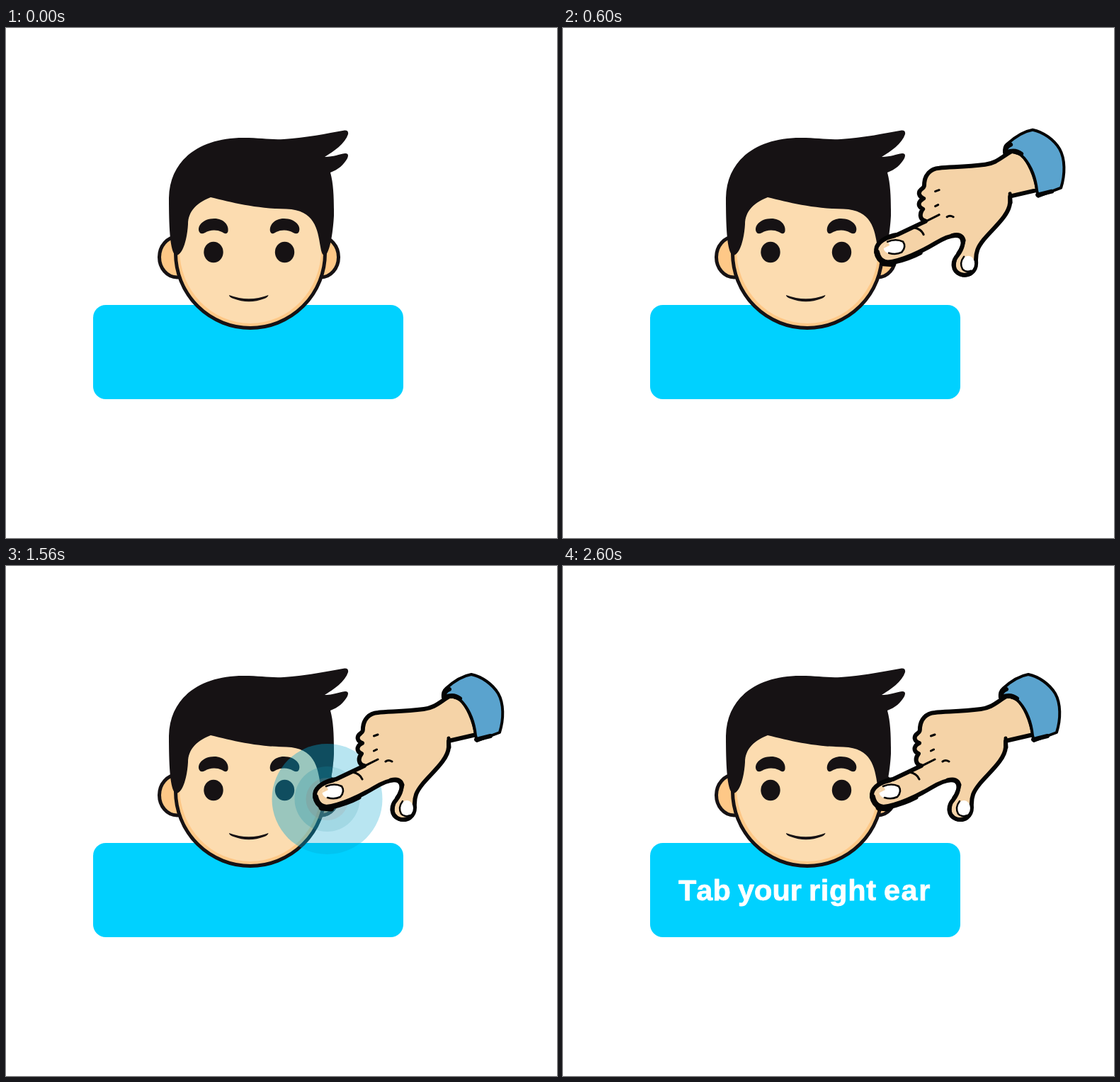
Write an HTML page that moves like this. It is 778 px wide and 720 px high and loops after 4800 ms.

```html
<!DOCTYPE html>
<html lang="en">
<head>
<meta charset="utf-8">
<title>Tab your right ear</title>
<style>
  html, body { margin: 0; width: 100%; height: 100%; overflow: hidden; background: #fff; }
  svg { display: block; width: 100%; height: 100%; }
  .ink { fill: #161214; }
  .line { fill: none; stroke: #050505; stroke-linecap: round; stroke-linejoin: round; }
  .ear { fill: #fec887; stroke: #161214; stroke-width: 5; }
  text {
    font: bold 41.5px "Liberation Sans", Arial, sans-serif;
    font-kerning: none;
    fill: #fff; stroke: #fff; stroke-width: .8; stroke-linejoin: round;
  }
</style>
</head>
<body>
<svg viewBox="0 0 778 720">
  <defs>
    <linearGradient id="edge" gradientUnits="userSpaceOnUse" y1="0" y2="0">
      <stop offset="0" stop-color="#fff"/>
      <stop offset="1" stop-color="#000"/>
    </linearGradient>
    <mask id="wipe" maskUnits="userSpaceOnUse" x="123" y="391" width="438" height="133">
      <rect x="123" y="391" width="438" height="133" fill="url(#edge)"/>
    </mask>
    <clipPath id="onHead">
      <circle cx="345" cy="318" r="108"/>
      <ellipse cx="444.5" cy="323.5" rx="27.5" ry="31"/>
      <use href="#hair"/>
    </clipPath>
    <g id="pulse">
      <circle cx="453.5" cy="329" fill="#06a5d0"/>
      <circle cx="453.5" cy="329" fill="#1b8ca3"/>
      <circle cx="453.5" cy="329" fill="#8a8580"/>
    </g>
  </defs>

  <rect x="123" y="391" width="438" height="133" rx="18" fill="#00d1ff"/>
  <g mask="url(#wipe)">
    <text y="472"><tspan x="163">Tab</tspan> <tspan x="247">your</tspan> <tspan x="347" letter-spacing=".7">right</tspan> <tspan x="453" letter-spacing="1.5">ear</tspan></text>
  </g>

  <use id="glow" href="#pulse"/>

  <g id="head">
    <ellipse class="ear" cx="241.5" cy="323.5" rx="25" ry="28.5"/>
    <ellipse class="ear" cx="444.5" cy="323.5" rx="25" ry="28.5"/>
    <circle cx="345" cy="318" r="105.5" fill="#fec887" stroke="#161214" stroke-width="5"/>
    <ellipse cx="345" cy="313" rx="100" ry="104" fill="#fcdcb0"/>
    <path id="hair" class="ink" d="M240 321C232 318 230 285 230 240C231 185 275 155 335 155C360 155 372 158 392 157
      C425 155 452 149 478 144.500Q484 144 483 150C479 163 463 174 450 182C463 182 470 178 479 177
      Q485 177 482 184C477 193 469 200 458 204C463 222 463 245 463 265C462 285 458 315 451 321
      Q446 323 444 309C440 284 436 257 396 255.500C352 255 318 246 289 239C268 247 257 260 257 277C256 296 250 321 240 321Z"/>
    <g id="brow">
      <path class="ink" d="M273 288C269 280 278 269 294 269C308 269 315 279 313.500 287C312 292 308 290 305 288C297 284 287 285 281 289Q275 292 273 288Z"/>
      <ellipse class="ink" cx="293" cy="316.500" rx="13.700" ry="14.700"/>
    </g>
    <use href="#brow" transform="translate(686.500 0) scale(-1 1)"/>
    <path class="ink" d="M315 377Q343 387.500 370.500 377Q370 380 365 382Q343 390.500 321 382Q315 380 315 377Z"/>
  </g>

  <g clip-path="url(#onHead)"><use href="#pulse"/></g>

  <g id="hand">
    <path class="line" stroke-width="6" style="fill:#f5d3a7" d="M628 183C612 192 606 200 590 202C560 206 540 205 525 207
      C512 208 505 217 504 228C504 232 504 234 501 236C494 241 496 247 503 250C495 254 494 261 502 265
      C497 271 497 280 506 282L466 301C452 303 437 311 436 322C436 332 442 338 452 340
      C472 338 500 325 520 313C535 304 548 300 555 304C562 310 557 322 551 330C543 339 543 352 555 357
      C567 361 577 353 577 341C576 325 580 318 588 308C600 293 624 274 625 256L625 247L664 238
      C661 218 652 197 641 187Z"/>
    <path class="line" stroke-width="8" d="M437 326Q439 336 447 340"/>
    <path class="line" stroke-width="9" d="M446 341L459 342"/>
    <path class="line" stroke-width="5" d="M460 341Q482 336 499 327M437 318Q443 307 462 303M547 338Q543 354 557 358Q570 360 575 350"/>
    <path class="line" stroke-width="5" d="M543 302Q557 298 560 309Q558 319 552 327M625 243L626 256"/>
    <path class="line" stroke-width="3" d="M503 284L525 273M489 291Q500 293 503 301M519.500 240L525 238M519.500 261L523.500 259M536 276Q540 273 545 276"/>
    <ellipse cx="461.500" cy="319" rx="15" ry="9.500" fill="#fff" transform="rotate(-6 461.500 319)"/>
    <path d="M445 321L452 310L455 316Z" fill="#f5d3a7"/>
    <path class="line" stroke-width="2.600" d="M452 311Q464 306 474 311Q479 318 472 326Q464 330 454 327"/>
    <ellipse cx="566" cy="342" rx="9" ry="11" fill="#fff"/>
    <path class="line" stroke-width="2.400" d="M560 332Q553 341 558 350Q563 355 570 352"/>
    <path class="line" stroke-width="4" style="fill:#5aa3ce" d="M617 186Q616 177 621 173C632 163 645 155 657 153
      C672 156 687 167 695 180C703 194 703 216 697 235L665 247L663 239C661 220 655 205 645 193C639 186 630 182 617 186Z"/>
    <path class="line" stroke-width="6" d="M618 184Q619 177 626 174M620 185Q632 180 641 187M664 245L684 240"/>
  </g>
</svg>
<script>
const LOOP = 4800, STEP = 40;
const $ = q => document.querySelector(q);
const hand = $('#hand'), edge = $('#edge'), glow = $('#glow');
const discs = [...document.querySelectorAll('#pulse circle')];

const clamp = x => Math.min(1, Math.max(0, x));
const span = (t, a, b) => clamp((t - a) / (b - a));
const smooth = x => x * x * (3 - 2 * x);

// Each row: time, then radius and opacity of one disc
const pulse = [
  [[940, 0, .88], [1120, 18, .88], [1360, 47.5, .88], [1440, 60, .75], [1560, 78, .4], [1680, 75, .24], [1760, 72, .2], [1960, 62, 0]],
  [[1400, 30, 0], [1560, 46, .25], [1760, 41, .34], [1960, 34, 0]],
  [[1400, 15, 0], [1560, 30, .25], [1760, 26, .3], [1960, 20, 0]]
];

function sample(rows, t) {
  if (t < rows[0][0]) return [0, 0];
  const i = rows.findIndex(r => r[0] > t);
  if (i < 0) return [0, 0];
  const [a, b] = [rows[i - 1], rows[i]];
  const k = span(t, a[0], b[0]);
  return [1, 2].map(n => a[n] + (b[n] - a[n]) * k);
}

function draw(t) {
  const away = 1 - smooth(span(t, 138, 864));
  hand.setAttribute('transform', `translate(${20.5 * away} ${-31 * away})`);
  hand.setAttribute('opacity', span(t, 0, 240));

  discs.forEach((disc, i) => {
    const [r, alpha] = sample(pulse[i], t);
    disc.setAttribute('r', r);
    disc.setAttribute('opacity', alpha);
  });
  // The rings thin out faster beyond the head
  glow.setAttribute('opacity', 1 - .6 * span(t, 1400, 1720));

  const x = 349 + (t - 2240) * .475;
  edge.setAttribute('x1', x);
  edge.setAttribute('x2', x + 30);
}

const start = performance.now();
function tick() {
  const t = (performance.now() - start) % LOOP;
  draw(Math.floor(t / STEP) * STEP);
  requestAnimationFrame(tick);
}
tick();
</script>
</body>
</html>
```
